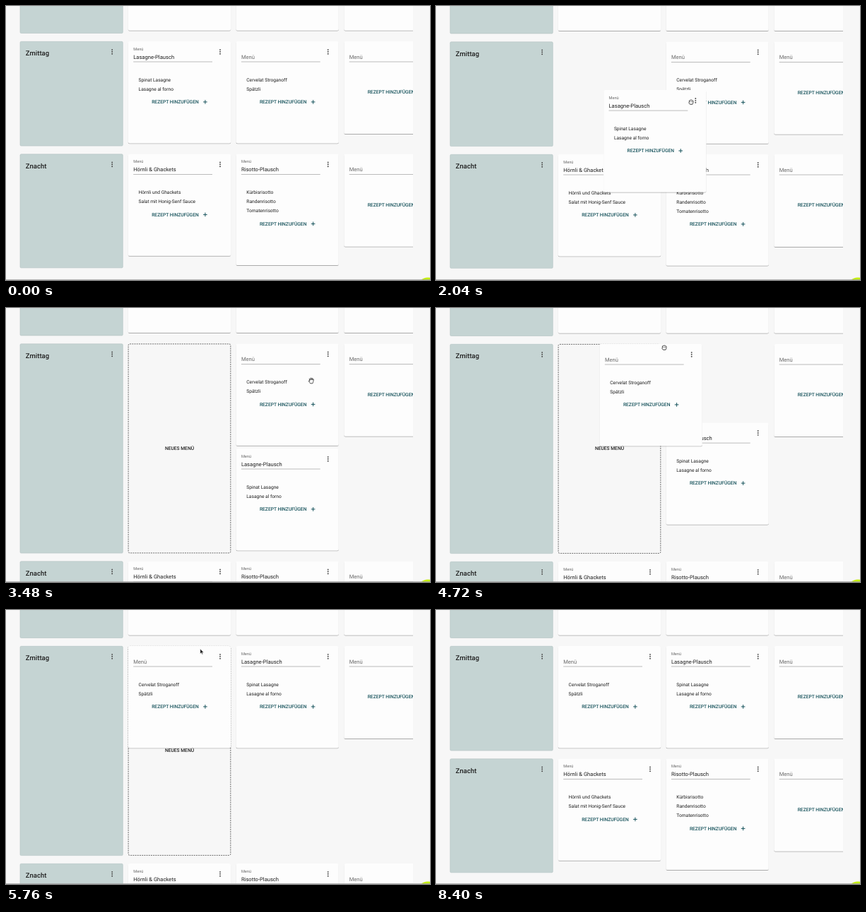
Write an HTML page that moves like this. It is 600 px wide and 388 px high and loops after 8520 ms.

```html
<!DOCTYPE html>
<html lang="de">
<head>
<meta charset="utf-8">
<title>Menüplan</title>
<style>
  html, body { margin: 0; width: 100%; height: 100%; overflow: hidden; background: #f7f7f7; }
  svg { display: block; width: 600px; height: 388px; }
  text { font-family: Roboto, "Liberation Sans", sans-serif; fill: #1f1f1f; text-rendering: geometricPrecision; }
  .head { font-size: 9.5px; font-weight: 500; }
  .field { font-size: 7.6px; }
  .empty { font-size: 7.6px; fill: #6c6c6c; }
  .label { font-size: 5.7px; fill: #6c6c6c; }
  .item { font-size: 6.65px; }
  .action { font-size: 6.7px; font-weight: 500; fill: #17535c; }
  .new { font-size: 6.7px; font-weight: 500; text-anchor: middle; }
  .card { fill: #fdfdfd; filter: url(#shadow); }
  .side { fill: #c5d4d3; stroke: #b3c2c1; stroke-width: .6; }
  .line { stroke: #8f8f8f; stroke-width: .6; }
  .plus { stroke: #17535c; stroke-width: 1; }
  .dots { fill: #484848; }
</style>
</head>
<body>
<svg id="stage" viewBox="0 0 600 388">
  <defs>
    <clipPath id="view"><rect y="-10" width="576" height="420"/></clipPath>
    <filter id="shadow" x="-5%" y="-5%" width="110%" height="112%">
      <feDropShadow dx="0" dy=".8" stdDeviation=".6" flood-color="#000" flood-opacity=".38"/>
    </filter>
  </defs>
  <rect width="600" height="388" fill="#f7f7f7"/>
  <g clip-path="url(#view)"><g id="page"></g></g>
  <circle cx="597" cy="400" r="15.5" fill="#c4f000" filter="url(#shadow)"/>
  <rect y="387.2" width="600" height=".8" fill="#a4a4a4"/>
  <g id="cursor">
    <path id="fist" fill="#fff" stroke="#2b2b2b" stroke-width=".9" stroke-linejoin="round"
      d="M-2.6-.2Q-3.2-2.6-1.6-2.4Q-1-3.3 0-2.7Q1-3.2 1.6-2.4Q3-2.4 3 -.6Q3 1.6 1.9 3.2H-1.6Q-3.4 1.6-3 .1ZM-1.3-.9V-.2M.2-1V-.2M1.6-.9V-.2"/>
    <path id="hand" fill="#fff" stroke="#2b2b2b" stroke-width=".8" stroke-linejoin="round"
      d="M-2 .6L-2.8-2.4Q-2.4-3.4-1.7-2.6L-1.2-1.2L-1-3.6Q-.4-4.4.1-3.6L.3-1.4L1-3.5Q1.7-4 2-3L1.7-1L2.5-2.3Q3.4-2.5 3.3-1.4Q2.8 1.8 1.9 3.8H-1.4Q-2.4 2.2-3.9.5Q-3.4-.7-2 .6Z"/>
    <path id="arrow" fill="#111" stroke="#fff" stroke-width=".6" d="M-2.2-4V3.1L-.6 1.6L.5 4.1L1.7 3.6L.6 1.2H2.8Z"/>
  </g>
</svg>
<script>
const LOOP = 8520, STEP = 40;
const COL = [20, 172.8, 325.5, 478.3], WIDTH = 145.3;
const TOP = 50, ROW = 159.5, SLOT = 148.5;
const $ = id => document.getElementById(id);

const rect = (cls, y, h, r = 2) => `<rect class="${cls}" y="${y}" width="${WIDTH}" height="${h}" rx="${r}"/>`;
const text = (cls, x, y, s) => `<text class="${cls}" x="${x}" y="${y}">${s}</text>`;
const at = (x, y, body, id = '') => `<g ${id && `id="${id}"`} transform="translate(${x} ${y})">${body}</g>`;
const dots = '<g class="dots">' + [-2.9, 0, 2.9].map(d => `<circle cx="130.2" cy="${14.8 + d}" r=".95"/>`).join('') + '</g>';

function side(title, h) {
  return rect('side', .3, h, 1.5) + text('head', 7.8, 20.2, title) + dots;
}

function card(title, items) {
  const n = items.length;
  const base = n ? 62.3 + 13 * n : 74.4;
  const field = title
    ? text('label', 7.4, 12.6, 'Menü') + text('field', 7.4, 24.6, title)
    : text('empty', 7.4, 24.8, 'Menü');
  return rect('card', 0, 131 + (n ? 13.3 * (n - 1) : 0)) + field + dots +
    '<path class="line" d="M7.4 29H119.2"/>' +
    items.map((s, i) => text('item', 14.8, 56.5 + 13 * i, s)).join('') +
    text('action', 33.4, base, 'REZEPT HINZUFÜGEN') +
    `<path class="plus" d="M106.3 ${base - 2.4}h5.6m-2.8-2.8v5.6"/>`;
}

$('page').innerHTML =
  at(COL[0], 0, rect('side', -20, 58.5, 1.5)) +
  COL.slice(1).map(x => at(x, 0, rect('card', -20, 54.4))).join('') +
  at(COL[0], TOP, side('Zmittag', 147.8)) .replace('<rect', '<rect id="rowSide"') +
  at(COL[3], TOP, card('', [])) +
  at(0, TOP + ROW,
    at(COL[0], 0, side('Znacht', 161)) +
    at(COL[1], 0, card('Hörnli &amp; Ghackets', ['Hörnli und Ghackets', 'Salat mit Honig-Senf Sauce'])) +
    at(COL[2], 0, card('Risotto-Plausch', ['Kürbisrisotto', 'Randenrisotto', 'Tomatenrisotto'])) +
    at(COL[3], 0, card('', [])), 'nextRow') +
  at(COL[1], TOP,
    `<rect x=".3" y=".4" width="${WIDTH - .6}" height="296" rx="2" fill="none" stroke="#4a4a4a" stroke-width=".8" stroke-dasharray="2 1.2"/>` +
    text('new', WIDTH / 2, 150.2, 'NEUES MENÜ'), 'newMenu') +
  at(0, 0, card('', ['Cervelat Stroganoff', 'Spätzli']), 'cervelat') +
  at(0, 0, card('Lasagne-Plausch', ['Spinat Lasagne', 'Lasagne al forno']), 'lasagne');

const linear = p => p;
const easeIn = p => p ** 1.4;
const easeOut = p => 1 - (1 - p) ** 3;
const smooth = p => p * p * (3 - 2 * p);

// Each key: time, x, y, easing towards it
function track(keys, t) {
  const i = keys.findIndex(k => k[0] > t);
  if (i === 0) return keys[0].slice(1, 3);
  if (i < 0) return keys[keys.length - 1].slice(1, 3);
  const [t0, x0, y0] = keys[i - 1], [t1, x1, y1, ease = linear] = keys[i];
  const p = ease((t - t0) / (t1 - t0));
  return [x0 + (x1 - x0) * p, y0 + (y1 - y0) * p];
}

const DRAG1 = 1500, GROW = 2320, DROP1 = 3080, DRAG2 = 4520, DROP2 = 5480, SHRINK = 5880;

const lasagnePath = [
  [DRAG1, COL[1], 0],
  [2040, COL[1] + 64.3, 68.6, easeIn],
  [2480, COL[1] + 121.8, 109.8],
  [2840, COL[1] + 142, 138, smooth],
  [DROP1, COL[2], SLOT, easeOut],
  [4697, COL[2], SLOT],
  [4947, COL[2], 0, easeOut]
];
const cervelatPath = [
  [DRAG2, COL[2], 0],
  [4720, COL[2] - 94, 0, easeIn],
  [4960, COL[1] + 12, 2, easeOut],
  [5280, COL[1] + 7, 1],
  [DROP2, COL[1], 0, easeOut]
];
const cursorPath = [
  [240, 388, 50],
  [360, 332, 60, easeOut],
  [560, 332, 60],
  [1200, 296, 65, smooth],
  [DRAG1, 297, 66],
  [2040, 361, 136, easeIn],
  [2480, 414.5, 173],
  [2840, 433, 201, smooth],
  [DROP1, 434, 198],
  [3480, 432, 103, smooth],
  [4000, 424, 57, smooth],
  [DRAG2, 424, 57],
  [4720, 323, 56, easeIn],
  [4960, 281, 59, easeOut],
  [5280, 277, 59],
  [7560, 277, 59],
  [7640, 318, 6]
];

const move = (id, [x, y]) => $(id).setAttribute('transform', `translate(${x} ${y})`);
const show = (id, on) => $(id).setAttribute('visibility', on ? 'visible' : 'hidden');
const within = (t, a, b) => t >= a && t < b;

function draw(t) {
  const tall = within(t, GROW, SHRINK);
  move('page', [0, t < DRAG1 ? 0 : t < DRAG2 ? .5 : 1]);
  $('rowSide').setAttribute('height', tall ? 147.8 + SLOT : 147.8);
  move('nextRow', [0, TOP + ROW + (tall ? SLOT : 0)]);
  show('newMenu', within(t, DROP1, SHRINK));

  for (const [id, path] of [['lasagne', lasagnePath], ['cervelat', cervelatPath]]) {
    const [x, y] = track(path, t);
    move(id, [x, TOP + y]);
  }
  const front = $(t < 3800 ? 'lasagne' : 'cervelat');
  if ($('page').lastChild !== front) $('page').append(front);

  const seen = within(t, 240, 7680);
  const held = within(t, DRAG1, DROP1) || within(t, DRAG2, DROP2);
  move('cursor', track(cursorPath, t));
  show('fist', seen && held);
  show('hand', seen && !held && t < DROP2);
  show('arrow', seen && t >= DROP2);
}

const start = performance.now();
function tick() {
  const t = (performance.now() - start) % LOOP;
  draw(Math.floor(t / STEP) * STEP);
  requestAnimationFrame(tick);
}
tick();
</script>
</body>
</html>
```
